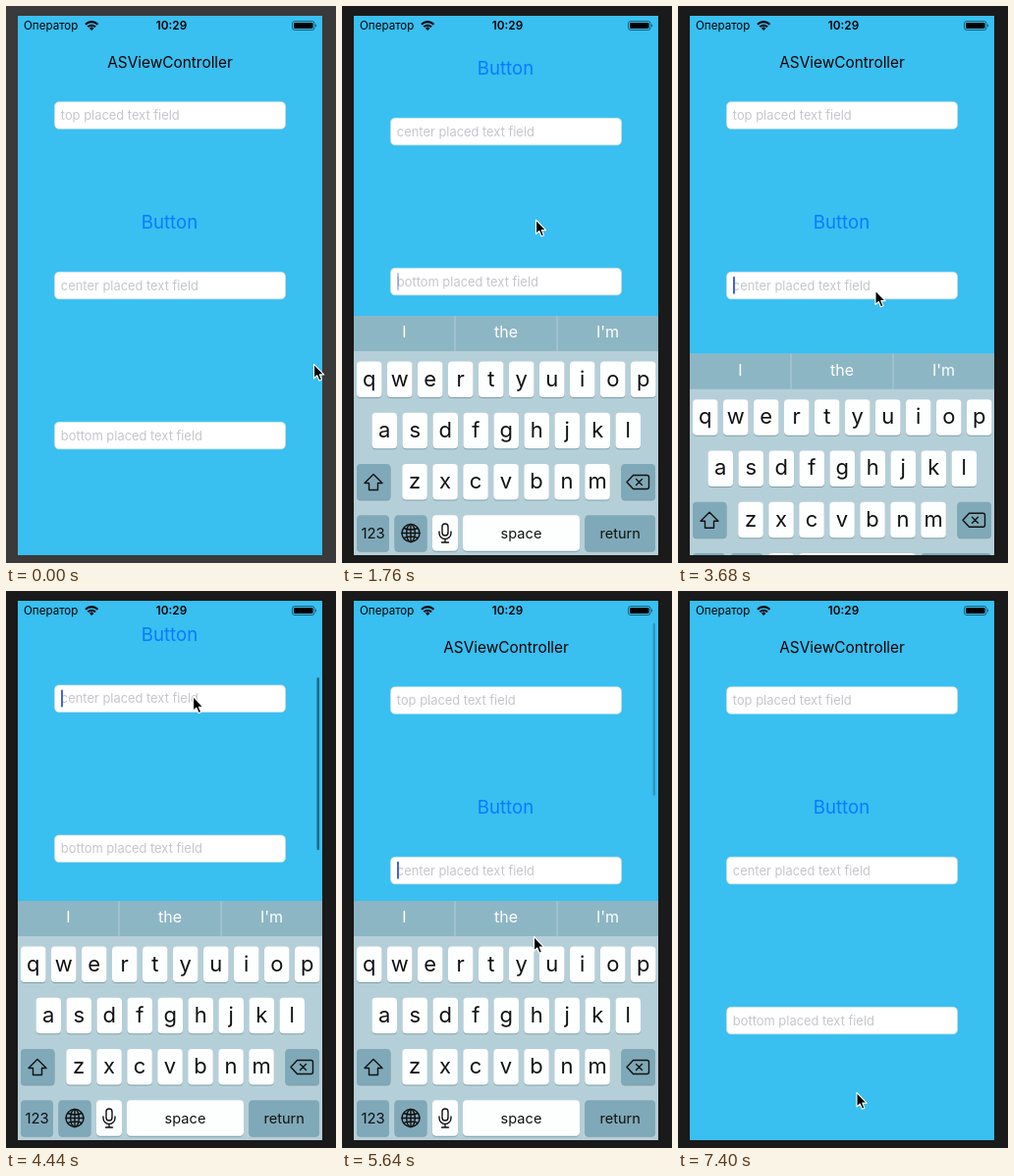
Recreate the animation shown at these times as an HTML page. Size 336 by 568 pixels, loop 7440 ms.

```html
<!DOCTYPE html>
<html lang="en">
<head>
<meta charset="utf-8">
<title>Keyboard and scrolling form</title>
<style>
  html, body { margin: 0; width: 100%; height: 100%; overflow: hidden; background: #1a1a1a; }
  svg { display: block; width: 336px; height: 568px; font-family: Inter, Roboto, sans-serif; }
  .mid { text-anchor: middle; }
  .hint { font-size: 12.9px; fill: #c5c6cb; }
  .line { fill: none; stroke: #111; stroke-width: 1.4; stroke-linejoin: round; stroke-linecap: round; }
</style>
</head>
<body>
<svg viewBox="0 0 336 568">
  <defs><clipPath id="screen"><rect x="12" y="10" width="310" height="550"/></clipPath></defs>
  <rect id="desk" width="336" height="568"/>
  <g clip-path="url(#screen)">
    <rect x="12" y="10" width="310" height="550" fill="#39bff0"/>
    <g id="page">
      <text class="mid" x="167" y="63" font-size="15.4">ASViewController</text>
      <text class="mid" x="166.5" y="226.5" font-size="18.6" fill="#0a7aff">Button</text>
      <g id="fields"></g>
      <rect id="caret" x="56" width="2" height="18" rx="1" fill="#4262e2"/>
    </g>
    <rect id="bar" x="316.5" width="2.5" height="176" rx="1.2" fill="#000" fill-opacity=".45"/>
    <g id="board">
      <rect x="12" y="316" width="310" height="246" fill="#b5cfd8"/>
      <rect x="12" y="316" width="310" height="36" fill="#8db6c4"/>
      <path d="M115 316v36M219 316v36" stroke="#b0cdd7" stroke-width="1"/>
      <g id="words" class="mid" font-size="16" fill="#fff"></g>
      <g id="keys" class="mid"></g>
      <path class="line" d="M32 477.500l9 9h-4.500v7h-9v-7h-4.500z"/>
      <path class="line" d="M290 485.500l6.500-7h14a2 2 0 0 1 2 2v10a2 2 0 0 1-2 2h-14zM299.500 482.500l6 6m0-6l-6 6"/>
      <g class="line" stroke-width="1.2">
        <circle cx="70" cy="537.500" r="9"/>
        <ellipse cx="70" cy="537.500" rx="4.300" ry="9"/>
        <path d="M61 537.500h18M70 528.500v18M62.700 532.500q7.300 3 14.600 0M62.700 542.500q7.300-3 14.600 0"/>
        <rect x="102" y="528" width="6" height="12" rx="3"/>
        <path d="M99 536v1.500a6 6 0 0 0 12 0V536M105 543.500v3.500M101.500 547h7"/>
      </g>
    </g>
    <text x="18" y="24" font-size="11.6">Оператор</text>
    <text class="mid" x="168.500" y="24" font-size="11.8" font-weight="600">10:29</text>
    <g fill="none" stroke="#000" stroke-width="2.200">
      <path d="M81 18.700a9 9 0 0 1 12.400 0M83.400 21.300a5.400 5.400 0 0 1 7.600 0"/>
      <path d="M87.200 25l-2.200-2.300a3 3 0 0 1 4.400 0z" fill="#000" stroke="none"/>
    </g>
    <rect x="291.500" y="15.500" width="22.500" height="9" rx="2.400" fill="none" stroke="#000" stroke-opacity=".5"/>
    <rect x="293" y="17" width="19.500" height="6" rx="1.200"/>
    <path d="M315.200 18.300q2 1.700 0 3.400z" fill-opacity=".6"/>
  </g>
  <path id="arrow" d="M.5 .5v14.500l3.300-3 2.200 5.200 2.500-1-2.200-5.100h4.400z" stroke="#fff" stroke-width="1.100" stroke-linejoin="round"/>
</svg>
<script>
const $ = id => document.getElementById(id);
const LOOP = 7440;

// Static parts
const field = (y, name) => `<rect x="49.500" y="${y - 14}" width="235" height="27.500" rx="4.500"
  fill="#fff" stroke="#cfdfe6" stroke-width=".6"/><text class="hint" x="55.800" y="${y + 4.4}">${name} placed text field</text>`;
$('fields').innerHTML = field(111.8, 'top') + field(285.3, 'center') + field(438.3, 'bottom');

$('words').innerHTML = ['I', 'the', "I'm"].map((w, i) =>
  `<text x="${63.5 + i * 103.5}" y="338">${w}</text>`).join('');

const key = (x, y, w, label = '', size = 22, fill = '#fdfefe') =>
  `<rect x="${x}" y="${y + 1}" width="${w}" height="36.500" rx="4" fill="#809ea9"/>
   <rect x="${x}" y="${y}" width="${w}" height="36.500" rx="4" fill="${fill}"/>
   <text x="${x + w / 2}" y="${y + (size > 20 ? 25 : 23.5)}" font-size="${size}" fill="#111">${label}</text>`;
const row = (letters, x, y) => [...letters].map((c, i) => key(x + i * 31, y, 25.5, c)).join('');
const DIM = '#7fa9b8';
$('keys').innerHTML = row('qwertyuiop', 15, 362.5) + row('asdfghjkl', 30.5, 414.7) + row('zxcvbnm', 61.3, 467)
  + key(15, 467, 34.5, '', 15, DIM) + key(284.3, 467, 34.7, '', 15, DIM)
  + key(15, 519.3, 33, '123', 14.8, DIM) + key(53.5, 519.3, 33, '', 15, DIM)
  + key(92, 519.3, 26, '') + key(123, 519.3, 119, 'space', 14.6) + key(247.3, 519.3, 71.7, 'return', 14.6, DIM);

// Motion
const clamp = u => Math.min(1, Math.max(0, u));
const ramp = (t, a, b) => clamp((t - a) / (b - a));
const ease = {
  both: u => u * u * (3 - 2 * u),
  in: u => u * u,
  out: u => 1 - (1 - u) ** 2
};
// Critically damped spring, as used by the system keyboard
const spring = (t, start) => {
  const s = Math.max(0, t - start) * 0.01826;
  return 1 - (1 + s) * Math.exp(-s);
};
// Points are [time, easing into it, ...values]
const follow = (points, t) => {
  const i = points.findIndex(p => p[0] > t);
  if (i < 0) return points[points.length - 1].slice(2);
  const [a, b] = [points[i - 1], points[i]];
  const u = ease[b[1]](ramp(t, a[0], b[0]));
  return a.slice(2).map((v, k) => v + (b[k + 2] - v) * u);
};

const pointer = [
  [0, 'both', 314, 364], [220, 'out', 203, 450], [1000, 'both', 203, 450],
  [1640, 'both', 197, 217.5], [2680, 'both', 197, 217.5], [3360, 'both', 200.5, 289.5],
  [4040, 'both', 200.5, 289.5], [4480, 'in', 188, 70], [4760, 'both', 189, 116],
  [5160, 'in', 192.5, 342], [5400, 'out', 195, 352], [5700, 'both', 195, 352],
  [6320, 'both', 256.5, 236.5], [6760, 'both', 256.5, 236.5], [7390, 'both', 181.5, 511]
];
const drag = [
  [0, 'both', 0], [4040, 'both', 0], [4480, 'in', 211], [4720, 'out', 244],
  [4760, 'both', 244], [5160, 'in', 18], [5320, 'out', 0]
];
const OPEN1 = 460, CLOSE1 = 2080, OPEN2 = 3500, CLOSE2 = 6600;

function caretAlpha(t, start) {
  const p = (t - start) % 1000 / 1000;
  return 1 - ramp(p, .18, .28) + ramp(p, .45, .55);
}

function draw(now) {
  const t = now % LOOP;
  const first = spring(t, OPEN1) - spring(t, CLOSE1);
  const second = spring(t, OPEN2) - spring(t, CLOSE2);
  const scroll = 157 * first + follow(drag, t)[0];
  const [x, y] = follow(pointer, t);

  $('desk').setAttribute('fill', t < 440 ? '#3a3a3a' : '#1a1a1a');
  $('page').setAttribute('transform', `translate(0 ${-scroll})`);
  $('board').setAttribute('transform', `translate(0 ${245 * (1 - first - second)})`);
  $('arrow').setAttribute('transform', `translate(${x} ${y})`);

  const low = t >= OPEN1 && t < CLOSE1;
  const mid = t >= OPEN2 && t < CLOSE2;
  $('caret').setAttribute('y', low ? 429 : 275.7);
  $('caret').setAttribute('opacity', low ? caretAlpha(t, OPEN1 + 60) : mid ? caretAlpha(t, OPEN2 + 20) : 0);

  $('bar').setAttribute('y', 32.7 + .317 * scroll);
  $('bar').setAttribute('opacity', ramp(t, 4040, 4120) - ramp(t, 5500, 5750));
}

function tick() {
  draw(performance.now());
  requestAnimationFrame(tick);
}
tick();
</script>
</body>
</html>
```
